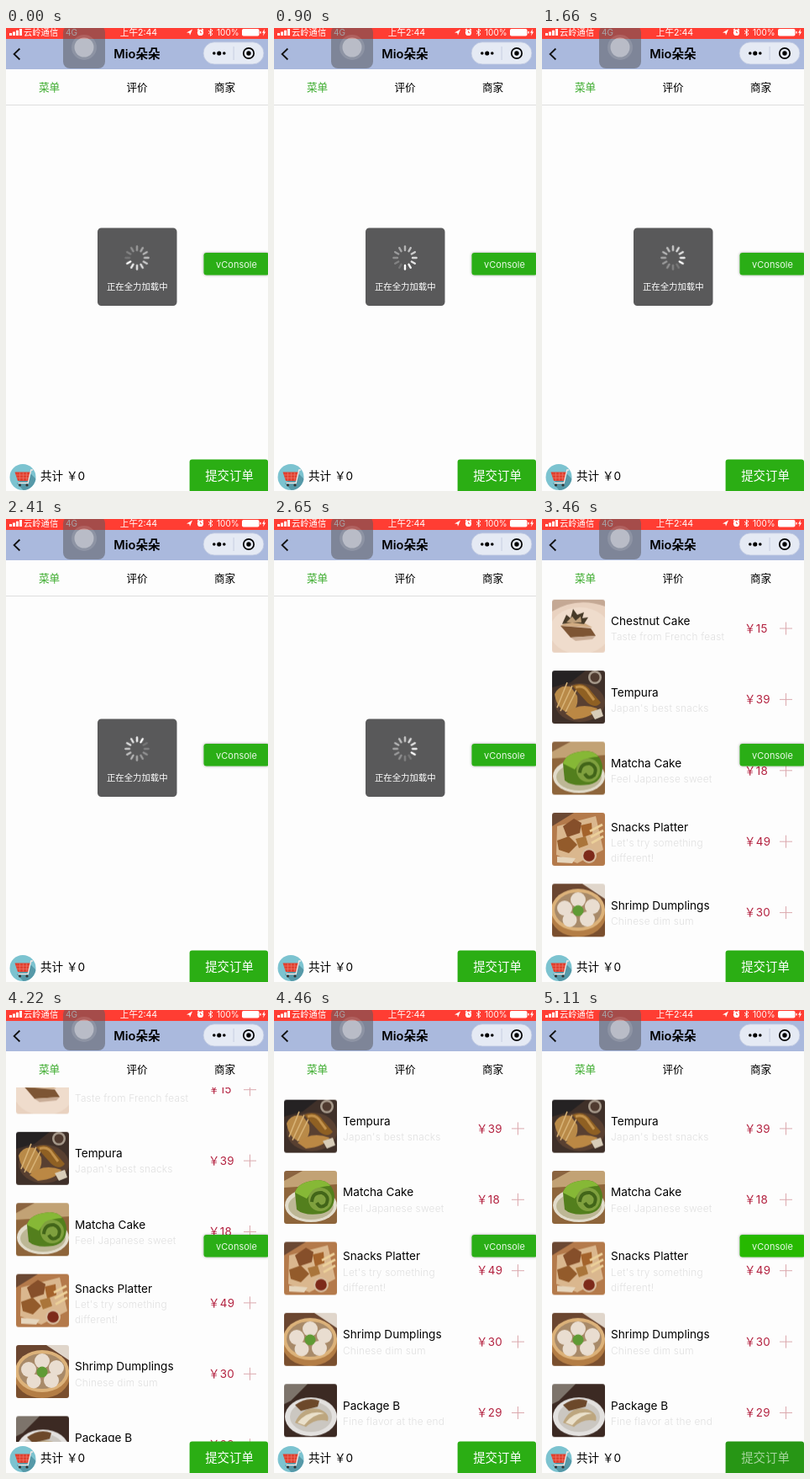
Recreate the animation shown at these times as an HTML page. Size 312 by 550 pixels, loop 5.26 s.

```html
<!DOCTYPE html>
<html lang="zh-CN">
<head>
<meta charset="utf-8">
<title>点餐</title>
<style>
html, body { margin: 0; width: 100%; height: 100%; overflow: hidden; background: #fdfdfd; }
svg { display: block; }
text { font-family: Inter, "Noto Sans CJK SC", "Noto Sans CJK", "Open Sans", sans-serif; }
.mid { text-anchor: middle; }
.name { font-size: 13.6px; fill: #000; }
.note { font-size: 11.8px; font-weight: 300; letter-spacing: .25px; }
.price { font-size: 13.4px; letter-spacing: .3px; fill: #b3213f; }

.list, .scroll, .photo, .note, .rule, .toast, .btn, .btn-text, .debug {
  animation: 5260ms step-end infinite;
}
.list { animation-name: list; }
.scroll { animation-name: scroll; }
.photo { animation-name: photo; }
.note { animation-name: note; }
.rule { animation-name: rule; }
.toast { animation-name: toast; }
.btn { animation-name: btn; }
.btn-text { animation-name: btn-text; }
.debug { animation-name: debug; }
.spin { animation: spin 5260ms steps(64) infinite; }

@keyframes list { 0% { opacity: 0 } 55.7%, 100% { opacity: 1 } }
@keyframes toast { 0% { opacity: 1 } 55.7% { opacity: .5 } 58.16%, 100% { opacity: 0 } }
@keyframes photo { 0% { opacity: 0 } 63.49%, 100% { opacity: 1 } }
@keyframes note { 0% { fill: #c6c6c6 } 63.49%, 100% { fill: #e0e0e0 } }
@keyframes rule { 0% { opacity: 1 } 63.49%, 100% { opacity: 0 } }
@keyframes scroll {
  0% { transform: translateY(0) }
  80.22% { transform: translateY(-35.3px) }
  82.5% { transform: translateY(-62px) }
  84.78%, 100% { transform: translateY(-73.5px) }
}
@keyframes btn { 0% { fill: #2bae14 } 97.14%, 100% { fill: #279615 } }
@keyframes btn-text { 0% { fill: #fff } 97.14%, 100% { fill: #a6d59d } }
@keyframes debug { 0% { fill: #2bae14 } 97.14%, 100% { fill: #25b904 } }
@keyframes spin { from { transform: rotate(240deg) } to { transform: rotate(2160deg) } }
</style>
</head>
<body>
<svg width="312" height="550" viewBox="0 0 312 550">
  <defs>
    <clipPath id="view"><rect y="92" width="312" height="421"/></clipPath>
    <clipPath id="round"><rect width="63" height="63" rx="3"/></clipPath>
    <clipPath id="disc"><circle cx="20" cy="533.5" r="15.5"/></clipPath>
    <filter id="glow" x="-20%" y="-40%" width="140%" height="180%">
      <feDropShadow dx="0" dy="0" stdDeviation="1.8" flood-color="#000" flood-opacity=".4"/>
    </filter>

    <g id="cake">
      <rect width="63" height="63" fill="#e9d2c0"/>
      <path d="M0 0H63V8Q30 -4 0 14Z" fill="#c4a894"/>
      <ellipse cx="33" cy="37" rx="36" ry="28" fill="#efdccc"/>
      <path d="M10 31L46 34L52 43L22 45Z" fill="#7d5534"/>
      <path d="M10 31L28 22L48 33Z" fill="#d0ab82"/>
      <path d="M12 29L17 18L22 22L25 11L30 18L38 15L36 22L43 21L38 29L24 27Z" fill="#463a28"/>
      <path d="M17 27L24 20L28 25L34 20L35 27Z" fill="#c0a17c"/>
      <path d="M22 45L52 43L48 47L28 49Z" fill="#c9ad97"/>
    </g>
    <g id="tempura">
      <rect width="63" height="63" fill="#3f3029"/>
      <path d="M0 0H40L22 14L0 20Z" fill="#252223"/>
      <ellipse cx="33" cy="38" rx="30" ry="23" fill="#594031"/>
      <circle cx="51" cy="8" r="8" fill="#a89b8d"/>
      <circle cx="51" cy="8" r="5.5" fill="#503b30"/>
      <path d="M3 28Q8 16 22 19L30 30Q32 44 22 50Q6 48 3 28Z" fill="#b98a48"/>
      <path d="M6 44L18 14M10 48L24 18M16 49L29 23" stroke="#d9b478" stroke-width="1.6"/>
      <path d="M24 18Q38 12 46 24L58 38Q52 46 42 38Z" fill="#8f6023"/>
      <path d="M28 20Q38 16 44 27L50 35" fill="none" stroke="#c3924c" stroke-width="3"/>
      <path d="M16 51Q32 37 54 45Q48 56 26 58Z" fill="#bb8844"/>
      <path d="M46 49L58 45L61 54L51 58Z" fill="#d8cdb9"/>
    </g>
    <g id="matcha">
      <rect width="63" height="63" fill="#8e653b"/>
      <path d="M0 0H63V16L0 20Z" fill="#c2a275"/>
      <path d="M0 0H22L0 12Z" fill="#8b6440"/>
      <ellipse cx="32" cy="41" rx="31" ry="20" fill="#e2dccb"/>
      <ellipse cx="32" cy="42" rx="27" ry="16" fill="#bdb795"/>
      <path d="M13 26Q16 13 40 11Q58 12 60 30Q60 48 44 51Q24 54 15 46Z" fill="#537f1d"/>
      <path d="M13 26Q16 13 40 11Q52 12 55 18Q36 18 27 33Z" fill="#86b836"/>
      <circle cx="43" cy="34" r="14" fill="#7fa03e"/>
      <path d="M33 37Q34 25 45 26Q55 30 50 40Q43 46 39 38" fill="none" stroke="#426519" stroke-width="4"/>
    </g>
    <g id="snacks">
      <rect width="63" height="63" fill="#b47a4b"/>
      <path d="M0 0H26L0 16Z" fill="#6b4833"/>
      <path d="M6 16L52 4L61 44L30 60L5 50Z" fill="#dab78e"/>
      <path d="M13 16L26 7L35 12L33 24L18 29Z" fill="#864f2a"/>
      <path d="M6 33L20 28L30 38L20 48L8 44Z" fill="#935b2b"/>
      <path d="M28 31L40 28L43 38L32 42Z" fill="#aa753a"/>
      <path d="M34 15L47 12L48 25L37 29Z" fill="#a4632b"/>
      <path d="M45 22L60 14M46 29L61 21M47 36L61 28" stroke="#ecd09a" stroke-width="3"/>
      <path d="M6 52L28 54L24 60L6 59Z" fill="#e6d6bd"/>
      <circle cx="44" cy="51" r="9" fill="#d8bd9f"/>
      <circle cx="44" cy="51" r="6.8" fill="#7d2a1a"/>
    </g>
    <g id="dimsum">
      <rect width="63" height="63" fill="#6b4630"/>
      <path d="M36 0H63V18Z" fill="#e0d6cb"/>
      <path d="M0 44H63V63H0Z" fill="#7a4f2e"/>
      <ellipse cx="31" cy="37" rx="33" ry="26" fill="#b37d45"/>
      <ellipse cx="31" cy="31" rx="32" ry="25" fill="#dcb27a"/>
      <ellipse cx="31" cy="31" rx="28" ry="21" fill="#a88a69"/>
      <g fill="#e9ddd0">
        <circle cx="15" cy="29" r="9"/><circle cx="31" cy="19" r="9"/><circle cx="48" cy="27" r="9"/>
        <circle cx="21" cy="43" r="8.5"/><circle cx="42" cy="42" r="9"/>
      </g>
      <circle cx="31" cy="32" r="6.5" fill="#5f9a34"/>
    </g>
    <g id="gyoza">
      <rect width="63" height="63" fill="#3c2a23"/>
      <path d="M0 0H28L8 20L0 24Z" fill="#7d746b"/>
      <ellipse cx="32" cy="39" rx="31" ry="23" fill="#e3e1df"/>
      <ellipse cx="32" cy="39" rx="25" ry="18" fill="#cbc7c1"/>
      <path d="M13 46Q22 26 42 30Q55 35 52 44Q38 40 26 51Z" fill="#bda67f"/>
      <path d="M16 46Q29 30 48 35Q34 36 24 49Z" fill="#eae0cb"/>
      <path d="M13 25Q28 14 42 20L40 27L20 32Z" fill="#6c482a"/>
    </g>
  </defs>

  <rect width="312" height="550" fill="#fdfdfd"/>

  <g clip-path="url(#view)"><g class="list"><g class="scroll" id="rows"></g></g></g>

  <!-- tabs -->
  <rect y="49" width="312" height="43" fill="#fdfdfd"/>
  <rect class="rule" y="91" width="312" height="1" fill="#dedede"/>
  <g class="mid" font-size="12.6">
    <text x="51.5" y="75.2" fill="#3bab2c">菜单</text>
    <text x="156" y="75.2">评价</text>
    <text x="260.5" y="75.2">商家</text>
  </g>

  <!-- status and title bars -->
  <rect width="312" height="49" fill="#aab9dd"/>
  <rect width="312" height="13" fill="#ff3d33"/>
  <g fill="#fff">
    <path d="M4 9V6H7V9ZM8 9V4.5H11V9ZM12 9V2.8H15V9ZM16 9V1H19V9Z"/>
    <text x="21" y="8.8" font-size="10.3">云岭通信</text>
    <text x="71" y="8.6" font-size="10">4G</text>
    <text class="mid" x="158" y="8.8" font-size="10.6">上午2:44</text>
    <path d="M215 5.5L222 1.5L219 8.7L218.3 5.8Z"/>
    <circle cx="231.5" cy="5.4" r="3.6"/>
    <path d="M228 2.6L229.8 1M235 2.6L233.2 1" stroke="#fff" stroke-width="1.3"/>
    <path d="M231.5 3.4V5.6H233.3" fill="none" stroke="#ff3d33" stroke-width=".8"/>
    <path d="M241 3L246 7.2L243.5 9.3V1L246 3L241 7.2" fill="none" stroke="#fff" stroke-width=".9"/>
    <text x="251" y="8.7" font-size="10">100%</text>
    <rect x="281" y="1" width="20.5" height="8.5" rx="1.8"/>
    <rect x="302.3" y="3.7" width="1.4" height="3" rx=".7"/>
    <path d="M308 1L305 5.7H306.8L306 9.5L309.2 4.6H307.4Z"/>
  </g>
  <path d="M16.4 24.5L9.6 31L16.4 37.5" fill="none" stroke="#111" stroke-width="1.8"/>
  <text class="mid" x="156" y="35.8" font-size="14.6" font-weight="600">Mio朵朵</text>
  <rect x="235" y="16.8" width="72" height="26.2" rx="13.1" fill="#e5eaf4" stroke="#bcc6df" stroke-width=".8"/>
  <rect x="270.7" y="22" width=".8" height="16" fill="#bfc8dc"/>
  <circle cx="247.8" cy="30" r="1.8"/><circle cx="253.8" cy="30" r="2.6"/><circle cx="259.8" cy="30" r="1.8"/>
  <circle cx="289" cy="30" r="6.2" fill="none" stroke="#000" stroke-width="1.7"/>
  <circle cx="289" cy="30" r="2.7"/>

  <!-- order bar -->
  <rect y="513" width="312" height="37" fill="#fdfdfd"/>
  <circle cx="20" cy="533.5" r="15.5" fill="#7cc3d0"/>
  <g clip-path="url(#disc)">
    <path d="M13 541L28 528L42 542V556H27Z" fill="#5699a8"/>
    <path d="M10.5 527.5H29.5L26.5 538H14Z" fill="#e0402f"/>
    <path d="M12 531H28.5M13 534.5H27.5M16.5 528V537.5M20.5 528V537.5M24.5 528V537.5" stroke="#ee8578" stroke-width=".5"/>
    <path d="M32 525H29.8L26.2 540.5H14.5" fill="none" stroke="#f3e9e6" stroke-width="1.3"/>
    <circle cx="16.5" cy="543" r="1.6" fill="#333"/><circle cx="25" cy="543" r="1.6" fill="#333"/>
  </g>
  <text x="41" y="536.7" font-size="13.6">共计 ￥0</text>
  <path class="btn" d="M218.6 550V515.6Q218.6 512.5 221.7 512.5H309Q312 512.5 312 515.5V550Z"/>
  <text class="mid btn-text" x="266" y="537.3" font-size="14.4">提交订单</text>

  <g filter="url(#glow)"><rect class="debug" x="235.5" y="267" width="78" height="26.5" rx="3.3"/></g>
  <text class="mid" x="274.5" y="285" font-size="11" fill="#e9f8e6">vConsole</text>

  <g class="toast">
    <rect x="109" y="237.5" width="94.5" height="92.5" rx="4.5" fill="#59595a"/>
    <g transform="translate(156 273)"><g class="spin" id="spokes"></g></g>
    <text class="mid" x="156.3" y="311" font-size="10.4" fill="#fff">正在全力加载中</text>
  </g>

  <!-- floating touch button -->
  <rect x="68" y="-3" width="50" height="51" rx="8" fill="#5a5a5f" fill-opacity=".54"/>
  <circle cx="93" cy="23" r="15" fill="#fff" fill-opacity=".12"/>
  <circle cx="93" cy="23" r="11.5" fill="#fff" fill-opacity=".38"/>
</svg>
<script>
const PITCH = 84.4;
const dishes = [
  ['cake', 'Chestnut Cake', 15, 'Taste from French feast'],
  ['tempura', 'Tempura', 39, "Japan's best snacks"],
  ['matcha', 'Matcha Cake', 18, 'Feel Japanese sweet'],
  ['snacks', 'Snacks Platter', 49, "Let's try something", 'different!'],
  ['dimsum', 'Shrimp Dumplings', 30, 'Chinese dim sum'],
  ['gyoza', 'Package B', 29, 'Fine flavor at the end']
];

const row = ([photo, name, price, ...notes], i) => {
  const mid = 127 + PITCH * i;
  const top = mid - 8.4 * (notes.length - 1);
  const lines = notes.map((s, k) =>
    `<text class="note" x="82" y="${top + 17.4 + 18 * k}">${s}</text>`).join('');
  return `<g class="photo"><g transform="translate(12 ${mid - 31.3})" clip-path="url(#round)"><use href="#${photo}"/></g></g>
    <text class="name" x="82" y="${top - 0.9}">${name}</text>${lines}
    <text class="price" x="241" y="${mid + 7.7}">￥${price}</text>
    <path d="M283 ${mid + 3}h15m-7.5 -7.5v15" stroke="#dba9ae" fill="none"/>`;
};
document.getElementById('rows').innerHTML = dishes.map(row).join('');

// The brightest spoke leads, the others fade behind it.
document.getElementById('spokes').innerHTML = Array.from({ length: 12 }, (_, i) =>
  `<rect x="-1.2" y="-14.8" width="2.4" height="7" rx="1.2" fill="#fff"
    opacity="${1 - 0.075 * i}" transform="rotate(${-30 * i})"/>`).join('');
</script>
</body>
</html>
```
